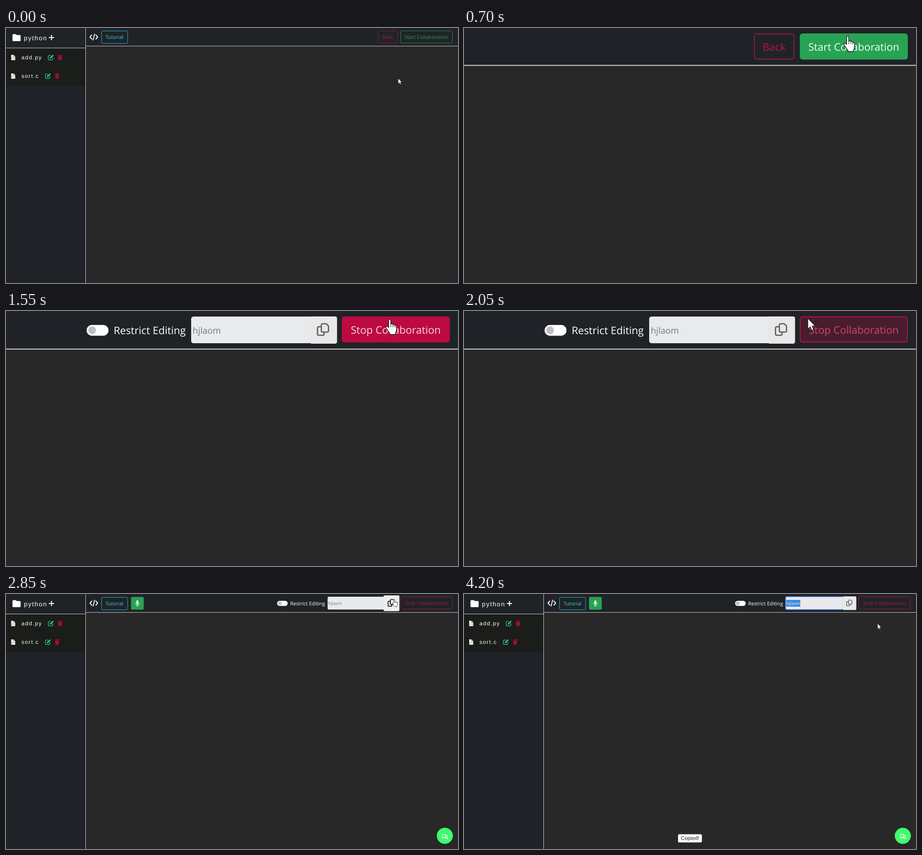
An HTML page that plays this animation: 996 by 562 pixels, repeating every 4.25 s.

```html
<!DOCTYPE html>
<html lang="en">
<head>
<meta charset="utf-8">
<title>Collaboration demo</title>
<style>
  html, body { margin: 0; width: 100%; height: 100%; overflow: hidden; background: #282828; }
  svg { display: block; width: 996px; height: 562px; }
  text { font-family: "Open Sans", "Noto Sans", sans-serif; font-size: 11.05px; text-rendering: geometricPrecision; white-space: pre; }
  .mid { text-anchor: middle; }
  .side { font-family: "Liberation Sans", Arial, sans-serif; fill: #fff; }
  .line { fill: none; stroke-linecap: round; stroke-linejoin: round; }
</style>
</head>
<body>
<svg viewBox="0 0 996 562">
  <defs>
    <g id="file">
      <path d="M11.5 59h5.2l3.6 3.6v8.2h-8.8z" fill="#fff"/>
      <path d="M16.5 59v3.7h3.8" fill="none" stroke="#1c1e1b" stroke-width=".7"/>
      <path d="M14.7 65l-1.4 1.6 1.4 1.6M17.1 65l1.4 1.6-1.4 1.6" fill="none" stroke="#1c1e1b" stroke-width=".9"/>
    </g>
    <g id="tools">
      <path class="line" d="M98 60.4h-3.4q-1.4 0-1.4 1.4v7q0 1.4 1.4 1.4h7q1.4 0 1.4-1.4v-3.2" stroke="#25b892" stroke-width="1.5"/>
      <path d="M96.3 67.5l.5-2.5 5.6-5.6q.8-.6 1.5.1l.4.4q.7.8 0 1.5l-5.5 5.6z" fill="#2fd0a5"/>
      <path d="M114 59.6h3l.7-.9h2.8l.7.9h3v1.5H114zM114.7 62h8.8l-.6 7.8q-.1 1-1.1 1h-5.4q-1 0-1.1-1z" fill="#a20d35"/>
    </g>
  </defs>

  <g id="scene">
    <rect width="1000" height="566" fill="#282828"/>
    <rect x="176" width="824" height="39.5" fill="#1f2327"/>
    <rect width="175" height="566" fill="#1f2327"/>
    <rect y="45" width="175" height="82.5" fill="#1b1d1a"/>
    <rect y="43.5" width="175" height="1" fill="#cfd1d2"/>
    <rect x="175" width="1" height="566" fill="#cfd1d2"/>

    <path d="M16 13.5h5.5l2 2h7q1.7 0 1.7 1.7v10.1q0 1.7-1.7 1.7H16q-1.7 0-1.7-1.7V15.2q0-1.7 1.7-1.7z" fill="#fff"/>
    <text class="side" x="39.5" y="27" style="font-size:14px;letter-spacing:1.6px">python</text>
    <path d="M94.5 21h11.5M100.25 15.3v11.4" stroke="#fff" stroke-width="2"/>
    <use href="#file"/>
    <use href="#file" y="41"/>
    <text class="side" x="34" y="69" style="font-size:12.2px;letter-spacing:1.5px">add.py</text>
    <text class="side" x="34" y="110" style="font-size:12.2px;letter-spacing:1.5px">sort.c</text>
    <use href="#tools"/>
    <use href="#tools" x="-6.5" y="41"/>

    <path class="line" d="M189 15.5l-4 4.5 4 4.5M198 15.5l4 4.5-4 4.5M195.3 13.5l-3.4 13" stroke="#fff" stroke-width="1.9"/>

    <g id="bar">
      <rect x="176" y="38.5" width="824" height="1" fill="#1f2327"/>
      <rect x="176" y="39.3" width="824" height="1" fill="#cdcdcd"/>
      <rect x="210.5" y="6.5" width="57.5" height="27.5" rx="2.5" fill="none" stroke="#25b5c9"/>
      <text class="mid" x="239" y="24.1" fill="#35d3e8">Tutorial</text>
    </g>

    <g id="idle">
      <rect x="820.7" y="6.3" width="42.2" height="26.8" rx="2.5" fill="none" stroke="#9c1843" stroke-width=".9"/>
      <text class="mid" x="841.8" y="24" fill="#be1248">Back</text>
    </g>

    <g id="live">
      <rect x="275.5" y="6.5" width="28" height="28" rx="2.5" fill="#28a353"/>
      <rect x="287.4" y="14" width="4.2" height="8" rx="2.1" fill="#fff"/>
      <path class="line" d="M285.8 19.5q0 4 3.7 4t3.7-4M289.5 23.5v2.8M287.7 26.4h3.6" stroke="#fff" stroke-width="1.1"/>

      <rect x="597.4" y="14.9" width="23.3" height="11.4" rx="5.7" fill="#fff"/>
      <circle cx="603.3" cy="20.5" r="4.1" fill="#bfbfbf"/>
      <text x="626.2" y="24.8" fill="#fff">Restrict Editing</text>

      <rect x="708.7" y="5.9" width="154.6" height="28.4" rx="2.5" fill="#e8eaee"/>
      <g id="focus">
        <rect x="707.7" y="4.9" width="128.5" height="30.4" rx="3" fill="none" stroke="#1e3a68" stroke-width="2"/>
        <rect x="709.2" y="6.3" width="126" height="27.6" rx="2.5" fill="#e8eaee" stroke="#7eaaf0" stroke-width=".9"/>
        <rect x="710" y="13" width="31" height="15" fill="#3d87e2"/>
      </g>
      <text id="code" x="710.3" y="24" style="font-size:9.4px">hjlaom</text>

      <g id="copy">
        <rect id="copyBox" x="835" y="5.8" width="29" height="29" rx="2"/>
        <g id="copyIcon" class="line" stroke-width="1.4">
          <path d="M846.3 16.8h-1.7q-1.4 0-1.4 1.4v6.2q0 1.4 1.4 1.4h4.2q1.4 0 1.4-1.4v-1.6"/>
          <path d="M848.7 13.6h3.8l2.4 2.4v5q0 1.4-1.4 1.4h-4.8q-1.4 0-1.4-1.4v-6q0-1.4 1.4-1.4z"/>
        </g>
      </g>

      <circle cx="967" cy="535" r="18.2" fill="#111" opacity=".3"/>
      <circle cx="967" cy="533" r="17.8" fill="#40fb6d"/>
      <path class="line" d="M961.5 530h7.5v6h-5l-2.5 2zM971 532.5h1.5v7.5l-2-1.8h-4.5v-1" stroke="#fff" stroke-width="1.3"/>
    </g>

    <rect id="mainBox" x="869.5" y="6.3" width="114.1" height="26.8" rx="2.5" stroke-width=".9"/>
    <text id="mainText" class="mid" x="926.5" y="24"></text>

    <g id="toast">
      <rect x="471.7" y="529.5" width="52.5" height="18" rx="2.5" fill="#fff"/>
      <text class="mid" x="498" y="542.3" style="font:11.7px 'Liberation Sans',Arial,sans-serif" fill="#222">Copied!</text>
    </g>

    <g id="cursor" stroke="#1a1a1a" stroke-linejoin="round">
      <path id="arrow" d="M.3 .3V11.7L2.9 9.3 4.6 13.2 6.5 12.4 4.8 8.6H8.3Z" fill="#fff" stroke-width=".6"/>
      <g id="hand">
        <path d="M3.4 9.5V1.7Q3.4 .4 4.5 .4T5.7 1.7V5.6Q7.5 4.8 8 6.3 9.7 5.6 10.1 7 11.8 6.6 11.8 8.3V11.6Q11.8 14 10.6 15.2V16.8H4.7V15.5Q3 13.6 1.9 11.5L.7 9.6Q.2 8.5 1.1 8.1T2.6 8.6Z" fill="#fff" stroke-width=".7"/>
        <path d="M5.8 5.8V9M8 6.3V9M10.1 7V9.2" fill="none" stroke-width=".6"/>
      </g>
    </g>
  </g>
</svg>

<script>
const LOOP = 4250, STEP = 50, LIVE_AT = 1350, CLICK_AT = 3400;
const ZOOM = { scale: 2.07, x: -1059 };
const $ = id => document.getElementById(id);
const smooth = p => p * p * (3 - 2 * p);

// Value of a table of [time, value] stops, eased between stops.
function track(t, stops) {
  if (t <= stops[0][0]) return stops[0][1];
  for (let i = 1; i < stops.length; i++) {
    const [t1, b] = stops[i], [t0, a] = stops[i - 1];
    if (t <= t1) return a + (b - a) * smooth((t - t0) / (t1 - t0));
  }
  return stops[stops.length - 1][1];
}

const mix = (a, b, p) => `rgb(${a.map((v, i) => Math.round(v + (b[i] - v) * p))})`;
const show = (id, on) => { $(id).style.display = on ? '' : 'none'; };
function set(id, attrs) {
  for (const k in attrs) $(id).setAttribute(k, attrs[k]);
}

const zoomStops = [[0, 0], [550, 1], [2600, 1], [2850, 0]];
const xStops = [[0, 864], [500, 915.5], [1550, 915.5], [2400, 855], [2850, 851], [3850, 851], [4200, 911]];
const yStops = [[0, 111], [500, 8.2], [1550, 8.2], [2400, 7], [2850, 11], [3850, 11], [4200, 65]];
const startHover = [[400, 0], [550, 1], [950, 1], [1120, 0]];
const stopHover = [[1350, 0], [1500, 1], [1950, 1], [2100, 0], [3950, 0], [4000, .3], [4050, .3], [4150, 0]];
const copyHover = [[2350, 0], [2600, 1], [3950, 1], [4200, .15]];
const handSpans = [[450, 1000], [1400, 2000], [2250, 4050]];

const BAR = [31, 35, 39];
const START = { label: 'Start Collaboration', ink: [40, 157, 82], fill: [40, 163, 83], lit: [245, 252, 247] };
const STOP = { label: 'Stop Collaboration', ink: [190, 18, 72], fill: [189, 10, 65], lit: [242, 216, 225] };

function mainButton(kind, hover) {
  set('mainBox', { fill: mix(BAR, kind.fill, hover), stroke: mix(kind.ink, kind.fill, hover) });
  set('mainText', { fill: mix(kind.ink, kind.lit, hover) });
  $('mainText').textContent = kind.label;
}

function render(t) {
  const live = t >= LIVE_AT, copied = t >= CLICK_AT;

  const z = track(t, zoomStops);
  set('scene', { transform: `translate(${ZOOM.x * z} 0) scale(${1 + (ZOOM.scale - 1) * z})` });

  show('live', live);
  show('idle', !live);
  set('bar', { transform: `translate(0 ${live ? .75 : 0})` });
  mainButton(live ? STOP : START, track(t, live ? stopHover : startHover));

  const h = track(t, copyHover), size = 1 + .2 * h;
  set('copy', { transform: `translate(849.5 20.3) scale(${size}) translate(-849.5 -20.3)` });
  set('copyBox', { fill: mix([231, 232, 231], [238, 238, 237], h) });
  set('copyIcon', { stroke: mix([100, 100, 100], [0, 0, 0], h) });

  show('focus', copied);
  set('code', { fill: copied ? '#eaf2ff' : '#757b82' });
  set('toast', { opacity: track(t, [[CLICK_AT - STEP, 0], [CLICK_AT + 100, 1]]) });

  const hand = handSpans.some(([a, b]) => t >= a && t < b);
  show('hand', hand);
  show('arrow', !hand);
  set('cursor', { transform: `translate(${track(t, xStops)} ${track(t, yStops)})` });
}

const begin = performance.now();
function tick() {
  const t = (performance.now() - begin) % LOOP;
  render(Math.floor(t / STEP) * STEP);
  requestAnimationFrame(tick);
}
tick();
</script>
</body>
</html>
```
